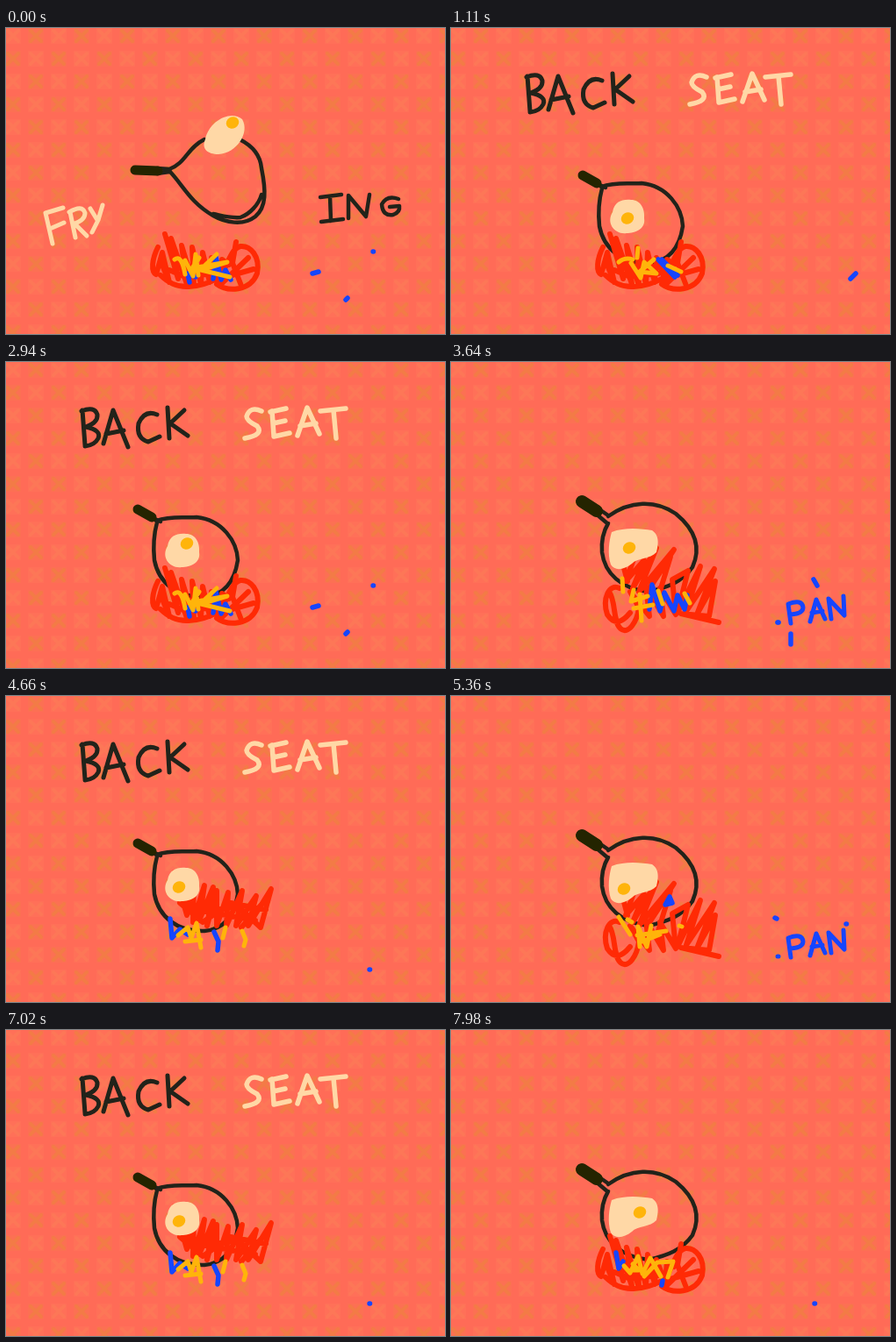
These frames come from a looping animation (500 by 349 pixels, 8 s). An HTML page with a canvas:

```html
<!DOCTYPE html>
<html lang="en">
<head>
<meta charset="utf-8">
<title>Frying egg</title>
<style>
  html, body { margin: 0; width: 100%; height: 100%; overflow: hidden; background: #ff6b57; }
  canvas { display: block; }
</style>
</head>
<body>
<canvas id="stage" width="500" height="349"></canvas>
<script>
const ctx = document.getElementById('stage').getContext('2d');
ctx.lineCap = ctx.lineJoin = 'round';

const INK = '#22231a', GRIP = '#242400', CREAM = '#ffd8a6', YOLK = '#ffb40a', RED = '#ff2a05', BLUE = '#1545ff';
const LOOP = 8000, SCENE_LOOP = 2000, STEP = 140;

function stroke(path, color, width) {
  ctx.strokeStyle = color;
  ctx.lineWidth = width;
  ctx.stroke(new Path2D(path));
}

function fill(path, color) {
  ctx.fillStyle = color;
  ctx.fill(new Path2D(path));
}

const words = {
  back: [
    ['M87 55L90 95M86 56Q101 50 104 60Q105 69 91 74Q109 78 105 87Q101 95 90 96' +
     'M111 93L122 55L139 97M114 82L134 78M172 60Q158 54 151 70Q148 87 162 91L175 85' +
     'M184 52L186 87M203 55L187 70L207 84', INK, 5],
    ['M291 56Q278 50 274 62Q274 67 286 73Q294 83 272 87' +
     'M303 56L305 84M301 57L319 53M304 70L318 67M305 85L323 81' +
     'M332 84L343 52L357 82M335 73L353 70M358 56L387 53M373 55L376 87', CREAM, 5.5]
  ],
  fry: [
    ['M45 211L53 246M45 211L65 205M50 229L66 222' +
     'M73 210L79 239M72 210Q87 201 90 211Q90 219 78 223L92 237' +
     'M96 206L104 219M110 202L105 219L98 233', CREAM, 5],
    ['M358 193L382 190M369 192L370 220M359 221L384 218M390 217L390 191L410 215L414 190' +
     'M447 195Q434 190 428 201Q429 215 441 213Q449 210 448 203L437 204', INK, 4.5]
  ],
  dot: [
    ['M372 297h1M387 298L384 276Q400 270 401 280Q401 287 387 288' +
     'M409 296L416 271L426 293M411 286L423 284M433 293L430 270L448 289L447 267', BLUE, 5]
  ],
  none: []
};

const tilted = {
  rim: 'M172 160L187 161M172 166L186 164M186 161C205 154 206 137 226 127M266 127C284 136 290 148 291 160' +
       'C296 185 297 204 284 215C270 226 250 222 236 214C210 199 202 180 187 164' +
       'M291 190C288 201 278 212 267 216C254 217 246 214 236 212',
  handle: 'M147 162L173 163', grip: 11
};
const flat = {
  rim: 'M166 166L179 175M165 173L178 184M179 176C204 158 233 157 256 173C279 192 285 212 275 234' +
       'C263 251 247 257 225 262C194 259 175 241 172 217C171 204 173 194 179 184',
  handle: 'M149 159L166 170', grip: 14
};
const tiltedEgg = 'M227 127C231 106 256 93 269 104C278 119 263 143 242 144C230 144 222 138 227 127Z';
const poses = {
  low: {
    pan: {
      rim: 'M163 176L176 182M171 181C188 175 203 178 217 177C246 180 263 204 264 226C260 252 248 266 226 268' +
           'C195 269 174 252 169 226C167 206 169 194 172 183',
      handle: 'M150 168L166 177', grip: 11
    },
    egg: 'M184 210C186 198 195 195 205 196C216 196 221 206 220 217C222 229 210 234 200 234C187 236 176 223 184 210Z',
    center: [201, 216], lift: 0
  },
  lip: { pan: tilted, egg: tiltedEgg, center: [253, 117], lift: 0 },
  toss: { pan: tilted, egg: tiltedEgg, center: [253, 117], lift: -22 },
  wide: {
    pan: flat,
    egg: 'M183 194C198 188 217 190 229 192C238 198 236 209 234 217C227 225 212 223 206 230' +
         'C196 238 186 238 182 231C178 219 180 204 183 194Z',
    center: [207, 212], lift: 0
  }
};

// Scenes by start time inside the two-second cycle.
const scenes = [
  [0, 'lip', 'fry'], [610, 'low', 'back'], [1300, 'wide', 'dot'],
  [1700, 'toss', 'none'], [1960, 'wide', 'none']
];

const flames = [
  'M173 250C166 264 165 278 171 281L178 256L186 290L177 268M181 235L196 286L188 240L206 292L200 248' +
  'L214 294L212 250L222 292L224 256L232 290L234 262L244 288L246 264L254 270' +
  'M176 282Q190 296 208 295Q226 294 240 286M186 276L204 284L236 280' +
  'M240 292C252 301 278 301 286 280C290 260 278 248 267 249C255 252 252 273 240 292' +
  'M250 284L282 275M262 244L258 268L268 294M246 291L276 262',
  'M187 198L201 250M215 206L199 250L220 226L207 258L234 212L214 262L254 214L226 258L250 222L236 268' +
  'M192 258C180 252 172 270 178 288C186 300 194 298 204 286' +
  'M180 262C188 272 184 296 193 304C202 312 212 296 214 280L204 262L226 290L222 256L242 290L238 258L256 288L252 248' +
  'L270 238L258 286L284 233L268 284L300 236L280 288L301 250L294 290L262 287L305 297',
  'M192 201L206 250L214 212L213 258L226 216L220 256L236 218L229 262L240 222L240 262L253 224L251 262L269 222' +
  'L262 262L285 228L276 262L302 220L290 264L264 240L212 248L192 202' +
  'M198 236L224 258L256 236L296 244M207 240L240 248L284 256M268 264L296 232'
];

// Each look: blue and yellow fire cores, sparks and the yolk's drift.
const looks = [
  {
    blue: 'M209 290L207 280L216 284M236 286L239 261L245 287L250 276L256 287',
    yellow: 'M192 264Q200 258 204 281M204 265L213 283L216 258L219 282M220 262L212 274L252 267L222 276L255 284' +
            'M222 275L240 258',
    sparks: 'M418 255h.5M349 280L356 278M387 310L389 308', yolk: [5, -9]
  },
  {
    blue: 'M236 264L255 284M240 264L258 282', yellow: 'M191 267Q198 261 207 264M213 251L212 262' +
            'M205 268L216 285L220 267L234 280L215 278L231 264M247 271L262 278',
    sparks: 'M455 286L461 280', yolk: [0, 1]
  },
  {
    blue: 'M244 238L249 229L252 236Z', yellow: 'M191 252L204 272M201 255L206 258M215 286L213 263L223 286L228 262' +
            'M212 273L245 268M218 280L238 272M260 262L263 263',
    sparks: 'M369 253L371 254M450 260h.5', yolk: [-10, 8]
  },
  {
    blue: 'M226 282L229 254L238 284L243 263L254 284L258 266L266 282L269 266',
    yellow: 'M195 247L196 262M208 260L205 273L224 267M215 265L217 295M208 281L230 277M236 261L241 276M266 264L272 275',
    sparks: 'M413 248L417 255M372 297h1M387 310L387 322', yolk: [-4, 0]
  },
  {
    blue: 'M187 254L189 276L198 266L207 272M237 269L242 280L241 290',
    yellow: 'M196 273L207 264L211 276L217 259L222 287M204 280L222 278M250 264L247 276M269 268L273 278L271 285',
    sparks: 'M414 312h.5', yolk: [-4, 2]
  },
  {
    blue: 'M219 255L218 284L230 291L243 256L232 283L229 256L222 282M218 264L240 267',
    yellow: 'M197 257L210 284L208 260L218 276M211 278L237 274M248 255L257 254L248 279L244 262',
    sparks: 'M441 308L447 315', yolk: [0, -1]
  },
  {
    blue: 'M188 254L191 272L196 264M241 286L240 291',
    yellow: 'M197 269L204 277L213 258L218 278L227 260L239 281M207 267L214 274L205 274M220 281L235 265L253 264L247 282',
    sparks: 'M414 312h.5', yolk: [8, -4]
  }
];

// Moments where the flame sequence restarts, with its flame and its own look.
const cues = [[0, 0], [1110, 0], [2230, 1], [3640, 1], [4660, 2], [6160, 2], [7980, 0]];

function drawCloth() {
  ctx.fillStyle = '#ff6b57';
  ctx.fillRect(0, 0, 500, 349);
  for (let row = 0; row < 14; row++) {
    for (let col = 0; col < 20; col++) {
      const x = col * 26 - 1, y = row * 26;
      const strong = (row + col) % 2;
      ctx.fillStyle = strong ? 'rgba(235,140,60,.14)' : 'rgba(255,140,95,.14)';
      ctx.fillRect(x, y, 18, 18);
      stroke(`M${x + 3} ${y + 3}l12 12m0 -12l-12 12`,
        strong ? 'rgba(225,145,45,.32)' : 'rgba(245,145,85,.22)', 4);
    }
  }
}

function drawScene(t) {
  const cueIndex = cues.findLastIndex(([start]) => start <= t);
  const [cueTime, firstFlame] = cues[cueIndex];
  const steps = lead => Math.floor((t - cueTime + lead) / STEP);
  const look = lead => looks[(cueIndex + steps(lead)) % looks.length];

  const phase = t % SCENE_LOOP;
  const [, poseName, wordName] = scenes.findLast(([start]) => start <= phase);
  const { pan, egg, center, lift } = poses[poseName];

  drawCloth();
  for (const word of words[wordName]) stroke(...word);

  stroke(pan.rim, INK, 4.5);
  stroke(pan.handle, GRIP, pan.grip);

  // The wide egg lies behind the flame, the others in front of it.
  const drawFlame = () => {
    stroke(flames[(firstFlame + steps(0)) % flames.length], RED, 6);
    const core = look(40);
    stroke(core.blue, BLUE, 5.5);
    stroke(core.yellow, YOLK, 5);
  };
  const drawEgg = () => {
    ctx.save();
    ctx.translate(0, lift);
    fill(egg, CREAM);
    const [dx, dy] = look(0).yolk;
    ctx.fillStyle = YOLK;
    ctx.beginPath();
    ctx.ellipse(center[0] + dx, center[1] + dy, 7.5, 6.5, -0.5, 0, Math.PI * 2);
    ctx.fill();
    ctx.restore();
  };
  drawFlame();
  drawEgg();

  stroke(look(20).sparks, BLUE, 5.5);
}

const began = performance.now();
function tick() {
  drawScene((performance.now() - began) % LOOP);
  requestAnimationFrame(tick);
}
tick();
</script>
</body>
</html>
```
